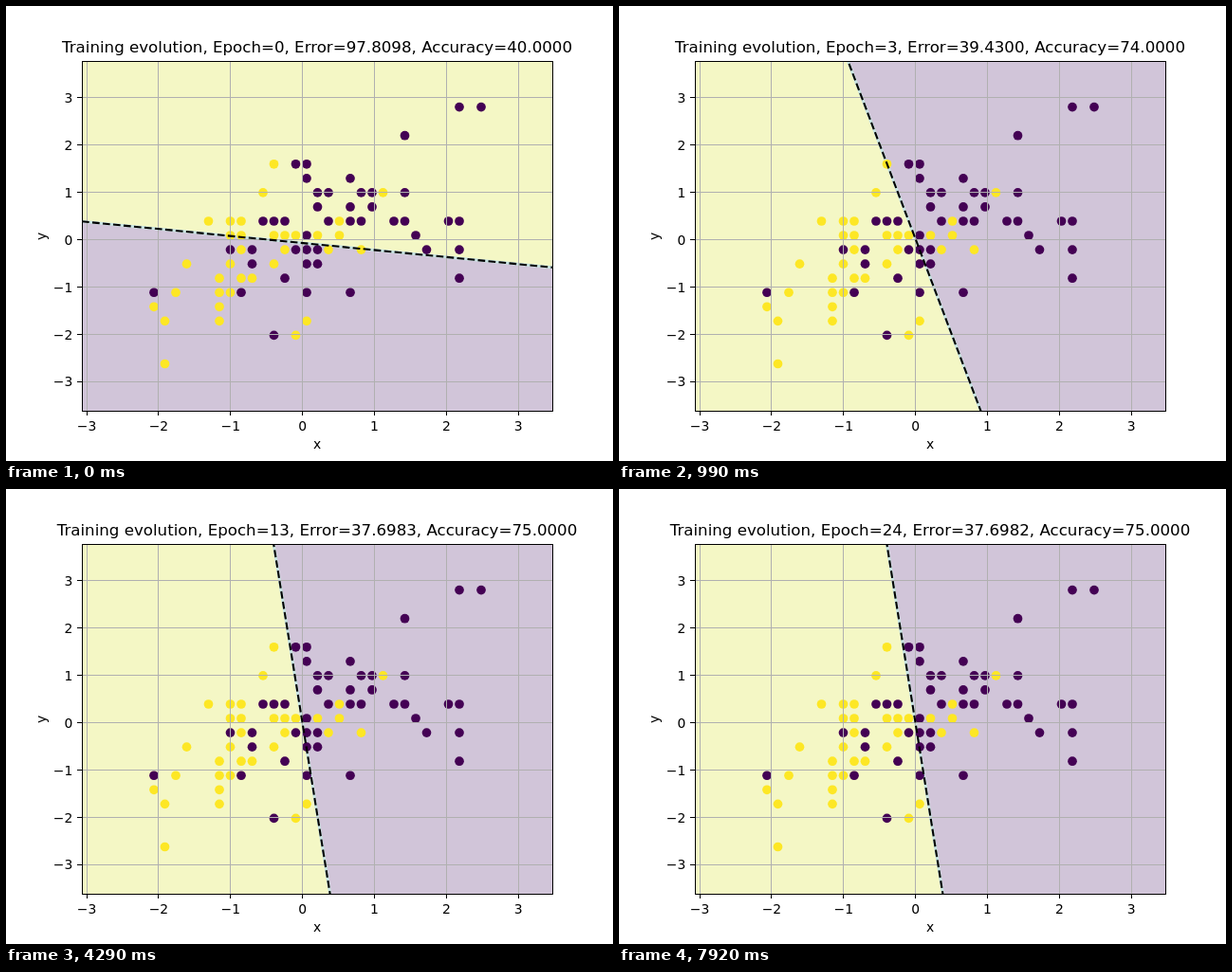
An HTML page with a canvas for the animation above (8 s loop, 640x480 px).

```html
<!DOCTYPE html>
<html lang="en">
<head>
<meta charset="utf-8">
<title>Training evolution</title>
<style>
  html, body { margin: 0; width: 100%; height: 100%; overflow: hidden; background: #fff; }
  canvas { display: block; }
</style>
</head>
<body>
<canvas id="stage" width="640" height="480"></canvas>
<script>
const ctx = document.getElementById('stage').getContext('2d');
const LOOP = 8000, STEP = 330;
const LEFT = 80, RIGHT = 576, TOP = 58, BOTTOM = 427;
const FONT = '"DejaVu Sans", sans-serif';

// Data points: lattice row -> lattice columns
const purple = {
  0: [14, 16], 2: [9], 4: [-1, 0], 5: [0, 4], 6: [1, 2, 5, 6, 9], 7: [1, 4, 6],
  8: [-4, -3, -2, 2, 4, 5, 8, 9, 13, 14], 9: [0, 10], 10: [-7, -5, -1, 0, 1, 11, 14],
  11: [-5, 0, 1], 12: [-2, 14], 13: [-14, -6, 0, 4], 16: [-3]
};
const yellow = {
  4: [-3], 6: [-4, 7], 8: [-9, -7, -6, 3], 9: [-7, -6, -3, -2, -1, 1, 3],
  10: [-6, -2, 2, 5], 11: [-11, -7, -3], 12: [-8, -6, -5], 13: [-12, -8, -7],
  14: [-14, -8], 15: [-13, -8, 0], 16: [-1], 18: [-13]
};

const errors = ['97.8098', '56.1013', '45.2376', '39.4300', '38.2316', '37.8612', '37.7491',
  '37.7145', '37.7029', '37.6997', '37.6987', '37.6984', '37.6983', '37.6983'];
const errorAt = epoch => errors[epoch] || '37.6982';
const accuracyAt = epoch =>
  [40, 71, 70, 74][epoch] || (epoch < 10 && epoch % 2 ? 74 : 75);

// Where the boundary meets the top and bottom of the plot: a damped oscillation
function crossings(epoch) {
  if (epoch === 1) return [190.5, 430.5];
  if (epoch === 2) return [461, 163.5];
  const swing = (-0.6) ** (epoch - 3);
  return [282.4 - 41 * swing, 341.4 + 40 * swing];
}

function boundary(epoch) {
  if (epoch === 0) {
    return { from: [LEFT, 227.3], to: [RIGHT, 275.8], corners: [[RIGHT, 0], [LEFT, 0]] };
  }
  const [top, bottom] = crossings(epoch);
  const at = y => [top + (bottom - top) * (y - TOP) / (BOTTOM - TOP), y];
  const ends = [at(-1), at(481)];
  const [from, to] = top < bottom ? ends : ends.reverse();
  return { from, to, corners: [[0, to[1]], [0, from[1]]] };
}

function path(points) {
  ctx.beginPath();
  points.forEach(p => ctx.lineTo(...p));
}

function stroke(points, color, width = 1) {
  path(points);
  ctx.strokeStyle = color;
  ctx.lineWidth = width;
  ctx.stroke();
}

function dots(rows, color) {
  ctx.fillStyle = color;
  for (const row in rows) {
    for (const col of rows[row]) {
      ctx.beginPath();
      ctx.arc(317 + 11.5 * col, 106.6 + 15.05 * row, 4.86, 0, 2 * Math.PI);
      ctx.fill();
    }
  }
}

function text(str, x, y, size = 13.89, align = 'center') {
  ctx.font = `${size}px ${FONT}`;
  ctx.textAlign = align;
  ctx.fillStyle = '#000';
  ctx.fillText(str, x, y);
}

const ticks = [-3, -2, -1, 0, 1, 2, 3];
const tickX = v => Math.floor(312.6 + 75.85 * v) + 0.5;
const tickY = v => Math.floor(246.5 - 49.85 * v) + 0.5;
const label = v => String(v).replace('-', '\u2212');

function drawPlot(epoch) {
  const { from, to, corners } = boundary(epoch);
  ctx.save();
  ctx.beginPath();
  ctx.rect(LEFT, TOP, RIGHT - LEFT, BOTTOM - TOP);
  ctx.clip();

  ctx.fillStyle = '#d1c5d9';
  ctx.fillRect(LEFT, TOP, RIGHT - LEFT, BOTTOM - TOP);
  path([from, to, ...corners]);
  ctx.fillStyle = '#f4f7c5';
  ctx.fill();
  stroke([from, to], '#c8e4e2', 3);

  dots(yellow, '#fde725');
  dots(purple, '#440154');

  for (const v of ticks) {
    stroke([[tickX(v), TOP], [tickX(v), BOTTOM]], '#b0b0b0');
    stroke([[LEFT, tickY(v)], [RIGHT, tickY(v)]], '#b0b0b0');
  }

  ctx.setLineDash([7.71, 3.33]);
  stroke([from, to], '#000', 2.08);
  ctx.restore();
}

function drawAxes() {
  for (const v of ticks) {
    stroke([[tickX(v), BOTTOM], [tickX(v), BOTTOM + 5]], '#000');
    stroke([[LEFT - 5, tickY(v)], [LEFT, tickY(v)]], '#000');
    text(label(v), 312.6 + 75.85 * v, 448);
    text(label(v), 70.3, 251.8 - 49.85 * v, 13.89, 'right');
  }
  ctx.strokeRect(LEFT + 0.5, TOP + 0.5, RIGHT - LEFT, BOTTOM - TOP);
  text('x', 328, 467);
  ctx.save();
  ctx.translate(42, 243);
  ctx.rotate(-Math.PI / 2);
  text('y', 0, 0);
  ctx.restore();
}

function frame(now) {
  const epoch = Math.floor(now % LOOP / STEP);
  ctx.fillStyle = '#fff';
  ctx.fillRect(0, 0, 640, 480);
  drawPlot(epoch);
  drawAxes();
  text(`Training evolution, Epoch=${epoch}, Error=${errorAt(epoch)}, ` +
    `Accuracy=${accuracyAt(epoch)}.0000`, 328, 49, 16.67);
  requestAnimationFrame(frame);
}
requestAnimationFrame(frame);
</script>
</body>
</html>
```
